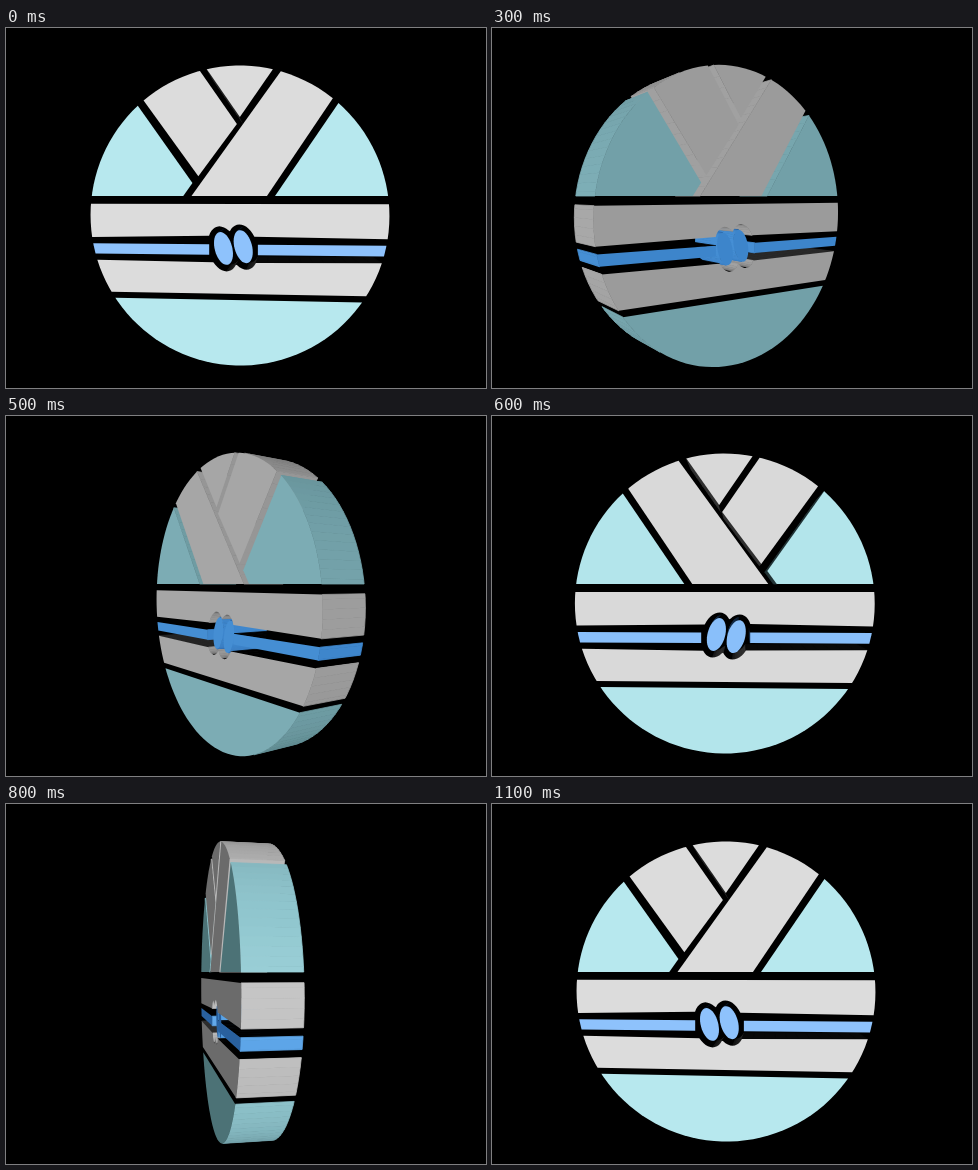
These frames come from a looping animation (480 by 360 pixels, 1200 ms). An HTML page with a canvas:

```html
<!DOCTYPE html>
<html lang="en">
<head>
<meta charset="utf-8">
<title>Turning medallion</title>
<style>
html, body { margin: 0; width: 100%; height: 100%; overflow: hidden; background: #000; }
canvas { display: block; }
</style>
</head>
<body>
<canvas id="stage" width="480" height="360"></canvas>
<script>
const ctx = document.getElementById('stage').getContext('2d');

// Camera and disc, in pixels; y = 0 is the horizon.
const CX = 232, CY = 168, FOCAL = 478, DIST = 502;
const RADIUS = 150, MID = 19.5, HALF = 24, KNOT_HALF = 20;
const STEP = 100;
const TURN = [-5, 2, 10, 35.6, 76, 124.3, 178, 231.5, 280, 321, 347, 355];
const RAD = Math.PI / 180, LIGHT = -13 * RAD;

// Colours at each light level.
const LEVELS = [0, .44, .67, .9, 1];
const GRAY = [[0, 0, 0], [120, 120, 120], [156, 156, 156], [190, 190, 190], [223, 223, 223]];
const TEAL = [[0, 0, 0], [86, 128, 133], [115, 161, 169], [146, 200, 208], [187, 236, 241]];
const BLUE = [[0, 0, 0], [46, 108, 178], [62, 134, 204], [86, 161, 229], [148, 198, 255]];

function shade(ramp, level) {
  const v = Math.max(0, Math.min(1, level));
  let i = 1;
  while (i < 4 && v > LEVELS[i]) i++;
  const k = (v - LEVELS[i - 1]) / (LEVELS[i] - LEVELS[i - 1]);
  return 'rgb(' + ramp[i].map((b, n) => Math.round(ramp[i - 1][n] + (b - ramp[i - 1][n]) * k)) + ')';
}

function oval(cx, cy, rx, ry, tilt, count) {
  const c = Math.cos(tilt), s = Math.sin(tilt);
  return Array.from({ length: count }, (_, i) => {
    const a = i / count * 2 * Math.PI, x = rx * Math.cos(a), y = ry * Math.sin(a);
    return [cx + x * c - y * s, cy + x * s + y * c];
  });
}

// Keeps the part of a polygon to the right of the way from a to b.
function clip(poly, a, b) {
  const side = p => (b[0] - a[0]) * (p[1] - a[1]) - (b[1] - a[1]) * (p[0] - a[0]);
  const out = [];
  poly.forEach((p, i) => {
    const q = poly[(i + 1) % poly.length], sp = side(p), sq = side(q);
    if (sp >= 0) out.push(p);
    if (sp * sq < 0) {
      const k = sp / (sp - sq);
      out.push([p[0] + (q[0] - p[0]) * k, p[1] + (q[1] - p[1]) * k]);
    }
  });
  return out;
}

function cut(...chain) {
  let poly = oval(0, MID, RADIUS, RADIUS, 0, 120);
  for (let i = 0; i < chain.length - 1; i++) poly = clip(poly, chain[i], chain[i + 1]);
  return poly;
}

// Knot lobes, and the opening left for them in the sash.
const TILT = -15 * RAD, LOBES = [[-13, 53], [7, 51]];
const lobe = ([x, y], rx, ry) => oval(x, y, rx, ry, TILT, 40);

function inOpening([cx, cy], [px, py]) {
  const c = Math.cos(TILT), s = Math.sin(TILT), x = px - cx, y = py - cy;
  return ((x * c + y * s) / 14.5) ** 2 + ((y * c - x * s) / 23) ** 2 < 1;
}

function notch(poly, y, dir) {
  const rim = LOBES.flatMap((l, i) => lobe(l, 14.5, 23).filter(p => !inOpening(LOBES[1 - i], p)))
    .filter(p => (p[1] - y) * dir > 0)
    .sort((a, b) => (a[0] - b[0]) * dir);
  const onLine = p => Math.abs(p[1] - y) < .001;
  const i = poly.findIndex((p, n) => onLine(p) && onLine(poly[(n + 1) % poly.length]));
  return [...poly.slice(0, i + 1), ...rim, ...poly.slice(i + 1)];
}

// Each piece: colours, outline, half its depth. The sunken knot comes first.
const E = 250;
const PIECES = [
  ...LOBES.map(l => [BLUE, lobe(l, 8.9, 17), KNOT_HALF]),
  [TEAL, cut([-99.6, -91], [-44, -13], [-53.4, 0], [-E, 0])],
  [GRAY, cut([-35, -124], [1, -72], [-38, -20], [-93.5, -96])],
  [GRAY, cut([37, -126], [4, -79], [-29, -127])],
  [GRAY, cut([95, -95], [31, 0], [-45, 0], [45, -124])],
  [TEAL, cut([E, 0], [39, 0], [101, -91])],
  [GRAY, notch(cut([-E, 8], [E, 8], [E, 42], [-E, 42]), 42, -1)],
  [BLUE, cut([-E, 48.5], [-27, 48.5], [-27, 59], [-E, 59])],
  [BLUE, cut([E, 59], [22, 59], [22, 48.5], [E, 48.5])],
  [GRAY, notch(cut([-E, 65.5], [E, 65.5], [E, 98], [-E, 98]), 65.5, 1)],
  [TEAL, cut([-E, 104], [E, 104])]
];

// Side walls, long ones split so that they sort well by depth.
const WALLS = PIECES.flatMap(([ramp, poly, half = HALF]) => poly.flatMap((p, i) => {
  const q = poly[(i + 1) % poly.length], dx = q[0] - p[0], dy = q[1] - p[1];
  const len = Math.hypot(dx, dy);
  if (len < .01) return [];
  const parts = Math.ceil(len / 12);
  const at = k => [p[0] + dx * k / parts, p[1] + dy * k / parts];
  return Array.from({ length: parts }, (_, k) =>
    ({ ramp, half, a: at(k), b: at(k + 1), nx: dy / len, ny: -dx / len }));
}));

function draw(angle) {
  const c = Math.cos(angle), s = Math.sin(angle);
  const place = ([x, y], w) => [x * c + w * s, y, w * c - x * s];
  const lit = (x, z) => x * Math.sin(LIGHT) + z * Math.cos(LIGHT);

  function fill(points, color, seam) {
    ctx.beginPath();
    for (const [x, y, z] of points) {
      const k = FOCAL / (DIST - z);
      ctx.lineTo(CX + x * k, CY + y * k);
    }
    ctx.closePath();
    ctx.fillStyle = ctx.strokeStyle = color;
    ctx.fill();
    if (seam) ctx.stroke();
  }

  ctx.fillStyle = '#000';
  ctx.fillRect(0, 0, 480, 360);
  ctx.lineWidth = .8;
  ctx.lineJoin = 'round';

  const seen = [];
  for (const { ramp, half, a, b, nx, ny } of WALLS) {
    const [x, y, z] = place([(a[0] + b[0]) / 2, (a[1] + b[1]) / 2], 0);
    const wx = nx * c, wz = -nx * s;
    if (-x * wx - y * ny + (DIST - z) * wz <= 0) continue;
    // Slanted walls stay nearly as bright as upright ones.
    const soft = Math.sign(nx) * Math.abs(nx) ** .35;
    seen.push({
      far: Math.hypot(x, y, DIST - z),
      color: shade(ramp, lit(soft * c, -soft * s)),
      quad: [place(a, half), place(b, half), place(b, -half), place(a, -half)]
    });
  }
  seen.sort((a, b) => b.far - a.far);
  for (const wall of seen) fill(wall.quad, wall.color, true);

  if (Math.abs(c) * DIST <= HALF) return;
  const side = Math.sign(c);
  for (const [ramp, poly, half = HALF] of PIECES)
    fill(poly.map(p => place(p, side * half)), shade(ramp, lit(side * s, side * c)));
}

let shown = -1;
const start = performance.now();
function tick() {
  const step = Math.floor((performance.now() - start) / STEP) % TURN.length;
  if (step !== shown) draw(TURN[shown = step] * RAD);
  requestAnimationFrame(tick);
}
tick();
</script>
</body>
</html>
```
